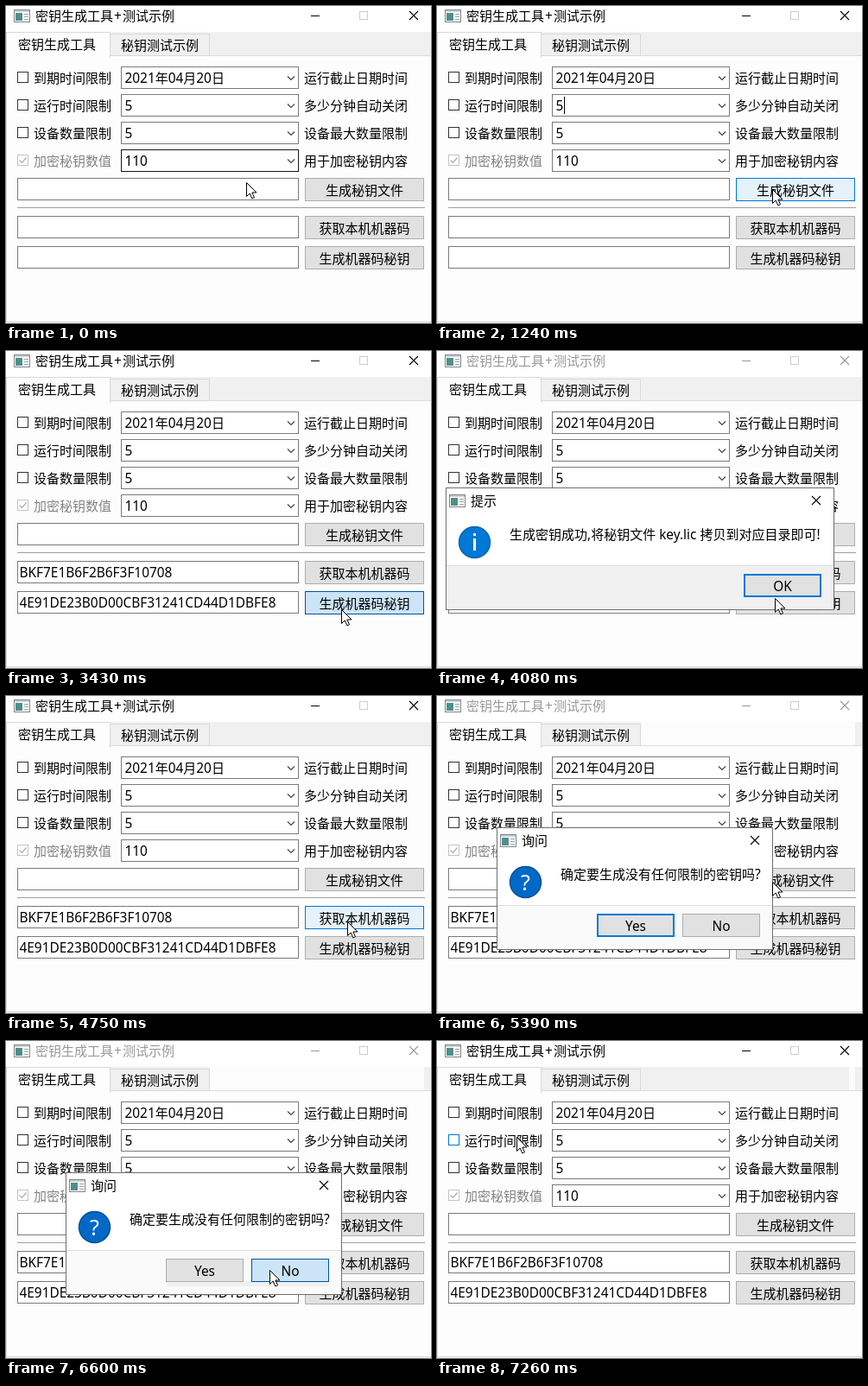
An HTML page with a canvas for the animation above (8 s loop, 492 by 367 pixels).

```html
<!DOCTYPE html>
<html lang="zh">
<head>
<meta charset="utf-8">
<style>
html, body { margin: 0; width: 100%; height: 100%; overflow: hidden; background: #fff; }
canvas { display: block; }
</style>
</head>
<body>
<canvas id="stage" width="492" height="367"></canvas>
<script>
const ctx = document.getElementById('stage').getContext('2d');
const LOOP = 8000;
const CJK = '15px "Noto Sans CJK SC", "Noto Sans CJK", sans-serif';
const LATIN = '15.4px "Noto Sans", "Open Sans", sans-serif';

// time, pointer x, pointer y, hovered control, pressed
const steps = [
  [0, 278, 204, 'combo3'],
  [160, 290, 250, 'edit1'],
  [720, 306, 241, ''],
  [840, 330, 230, ''],
  [990, 388, 212, 'make'],
  [1770, 388, 233, ''],
  [1890, 387, 252, 'fetch'],
  [2040, 386, 261, 'fetch'],
  [3030, 388, 299, 'sign'],
  [3430, 388, 299, 'sign', true],
  [3560, 388, 299, ''],
  [4080, 391, 286, ''],
  [4200, 394, 278, 'ok'],
  [4350, 396, 274, 'ok'],
  [4480, 396, 274, 'ok', true],
  [4630, 396, 274, ''],
  [4750, 395, 261, 'fetch'],
  [4900, 393, 245, 'fetch'],
  [5020, 390, 226, 'make'],
  [5140, 388, 215, 'make'],
  [5390, 388, 215, ''],
  [5700, 385, 215, ''],
  [5840, 345, 232, ''],
  [5960, 290, 248, ''],
  [6080, 248, 260, 'yes'],
  [6230, 276, 264, ''],
  [6350, 305, 265, 'no'],
  [6600, 305, 265, 'no', true],
  [6750, 260, 222, ''],
  [6870, 160, 150, ''],
  [6990, 95, 111, 'check1'],
  [7260, 92, 111, 'check1']
];

let hot, pressed;
const within = (t, from, to) => t >= from && t < to;

function fill(x, y, w, h, color) {
  ctx.fillStyle = color;
  ctx.fillRect(x, y, w, h);
}

function box(x, y, w, h, back, edge, line = 1) {
  fill(x, y, w, h, edge);
  fill(x + line, y + line, w - 2 * line, h - 2 * line, back);
}

function stroke(points, color, width = 1) {
  ctx.strokeStyle = color;
  ctx.lineWidth = width;
  ctx.beginPath();
  points.forEach(([x, y]) => ctx.lineTo(x, y));
  ctx.stroke();
}

// Chinese and Latin runs use slightly different sizes.
function textRuns(str) {
  return str.match(/[\u4e00-\u9fff]+|[^\u4e00-\u9fff]+/g).map(run => {
    ctx.font = /[\u4e00-\u9fff]/.test(run) ? CJK : LATIN;
    return { run, font: ctx.font, width: ctx.measureText(run).width };
  });
}

function text(str, x, y, color = '#000', centered = false) {
  const runs = textRuns(str);
  if (centered) x -= runs.reduce((sum, r) => sum + r.width, 0) / 2;
  ctx.fillStyle = color;
  for (const r of runs) {
    ctx.font = r.font;
    ctx.fillText(r.run, x, y);
    x += r.width;
  }
}

function cross(x, y, color) {
  stroke([[x, y], [x + 10, y + 10]], color, 1.1);
  stroke([[x + 10, y], [x, y + 10]], color, 1.1);
}

function windowIcon(x, y) {
  box(x, y, 19, 15, '#fff', '#7d8488');
  fill(x + 1, y + 1, 17, 2, '#c9ced2');
  fill(x + 2, y + 4, 8, 9, '#4f8f8a');
  for (let i = 0; i < 3; i++) fill(x + 12, y + 5 + i * 3, 5, 1, '#9aa0a4');
}

function button(id, label, x, y, w, isDefault = false) {
  const over = hot === id, down = over && pressed;
  const back = down ? '#cce4f7' : over ? '#e5f1fb' : '#e1e1e1';
  const edge = down ? '#005499' : over || isDefault ? '#0078d7' : '#adadad';
  box(x, y, w, 27, back, edge, isDefault && !down ? 2 : 1);
  text(label, x + w / 2, y + 19.5, '#000', true);
}

function edit(id, y, value) {
  box(13, y, 326, 26, '#fff', hot === id ? '#171717' : '#7a7a7a');
  if (value) text(value, 15.5, y + 19);
}

function row(i, label, value, hint) {
  const y = 70 + i * 32, locked = i === 3;
  const edge = locked ? '#c4c4c4' : hot === 'check' + i ? '#0078d7' : '#333';
  box(13, y + 6, 13, 13, '#fff', edge);
  if (locked) stroke([[15.5, y + 12.5], [18.5, y + 15.5], [23.5, y + 9.5]], '#b4b4b4', 1.4);
  text(label, 32, y + 19, locked ? '#838383' : '#000');
  box(133, y, 206, 26, '#fff', hot === 'combo' + i ? '#171717' : '#7a7a7a');
  text(value, 137.5, y + 19);
  stroke([[326, y + 11.5], [330, y + 15.5], [334, y + 11.5]], '#444', 1.2);
  text(hint, 345, y + 19);
}

function mainWindow(t, active) {
  const ink = active ? '#000' : '#999';
  fill(0, 0, 492, 367, '#fff');
  windowIcon(9, 4);
  text('密钥生成工具', 34, 17, ink);
  text('+', 125, 17, ink);
  text('测试示例', 135, 17, ink);
  fill(353, 11, 10, 1, ink);
  box(409, 6, 10, 10, '#fff', '#ccc');
  cross(467, 6, ink);

  fill(0, 30, 492, 28, '#f0f0f0');
  if (within(t, 5390, 6750)) fill(236, 30, 248, 28, '#fcfcfc');
  if (t >= 6750) fill(477, 30, 7, 28, '#fcfcfc');
  box(0, 57, 494, 309, '#fdfdfd', '#dcdcdc');
  box(120, 32, 116, 26, '#f0f0f0', '#d9d9d9');
  box(0, 30, 121, 30, '#fdfdfd', '#d9d9d9');
  fill(1, 57, 119, 4, '#fdfdfd');
  fill(0, 366, 492, 1, '#f0f0f0');
  text('密钥生成工具', 14, 50);
  text('秘钥测试示例', 133, 51);

  row(0, '到期时间限制', '2021年04月20日', '运行截止日期时间');
  row(1, '运行时间限制', '5', '多少分钟自动关闭');
  row(2, '设备数量限制', '5', '设备最大数量限制');
  row(3, '加密秘钥数值', '110', '用于加密秘钥内容');
  if (within(t, 160, 720) || within(t, 1240, 1770)) fill(147, 105, 1, 20, '#000');

  edit('edit0', 199);
  fill(13, 233, 472, 1, '#a0a0a0');
  edit('edit1', 243, t >= 2760 && 'BKF7E1B6F2B6F3F10708');
  edit('edit2', 278, t >= 3430 && '4E91DE23B0D00CBF31241CD44D1DBFE8');
  button('make', '生成秘钥文件', 346, 199, 138);
  button('fetch', '获取本机机器码', 346, 243, 138);
  button('sign', '生成机器码秘钥', 346, 278, 138);
}

function dialog(x, y, w, h, title, message, messageX, panel) {
  box(x, y, w, h, '#fff', '#6e6e6e');
  windowIcon(x + 4, y + 8);
  text(title, x + 29, y + 21);
  cross(x + w - 26, y + 10, '#000');
  fill(x + 1, y + h - 51, w - 2, 50, panel);
  fill(x + 1, y + h - 52, w - 2, 1, '#dfdfdf');
  text(message, messageX, y + 60);
}

function badge(x, y, color, rim) {
  ctx.beginPath();
  ctx.arc(x, y, 18, 0, Math.PI * 2);
  ctx.fillStyle = color;
  ctx.fill();
  ctx.strokeStyle = rim;
  ctx.lineWidth = 1.5;
  ctx.stroke();
}

function successDialog() {
  dialog(10, 158, 450, 142, '提示', '生成密钥成功,将秘钥文件 key.lic 拷贝到对应目录即可!', 84, '#f0f0f0');
  badge(43.5, 221.5, '#0078d7', '#0a63b0');
  fill(42, 217, 3, 14, '#fff');
  fill(42, 211, 3, 3, '#fff');
  button('ok', 'OK', 355, 258, 90, true);
}

function askDialog(t) {
  dialog(69, 152, 320, 142, '询问', '确定要生成没有任何限制的密钥吗?', 143, '#fafafa');
  if (t >= 6230) fill(186, 279, 188, 5, '#f0f0f0');
  badge(102.5, 215.5, '#0069c8', '#0a4f91');
  ctx.font = '25px "Noto Sans", sans-serif';
  ctx.fillStyle = '#fff';
  ctx.fillText('?', 97, 224.5);
  button('yes', 'Yes', 185, 252, 90, t < 6600);
  button('no', 'No', 284, 252, 90);
}

function pointer(x, y) {
  ctx.save();
  ctx.translate(x + 0.5, y + 0.5);
  const shape = new Path2D('M0 0V16L3.7 12.5L6.3 18.4L9 17.2L6.4 11.5H11.5Z');
  ctx.fillStyle = '#fff';
  ctx.fill(shape);
  ctx.strokeStyle = '#000';
  ctx.lineWidth = 1;
  ctx.stroke(shape);
  ctx.restore();
}

function draw(now) {
  const t = now % LOOP;
  const [, x, y, target, down = false] = steps.findLast(step => step[0] <= t) || steps[0];
  hot = target;
  pressed = down;
  const success = within(t, 3560, 4630), ask = within(t, 5390, 6750);
  mainWindow(t, !success && !ask);
  if (success) successDialog();
  if (ask) askDialog(t);
  pointer(x, y);
}

let start;
function tick(now) {
  start ??= now;
  draw(now - start);
  requestAnimationFrame(tick);
}
draw(0);
requestAnimationFrame(tick);
</script>
</body>
</html>
```
